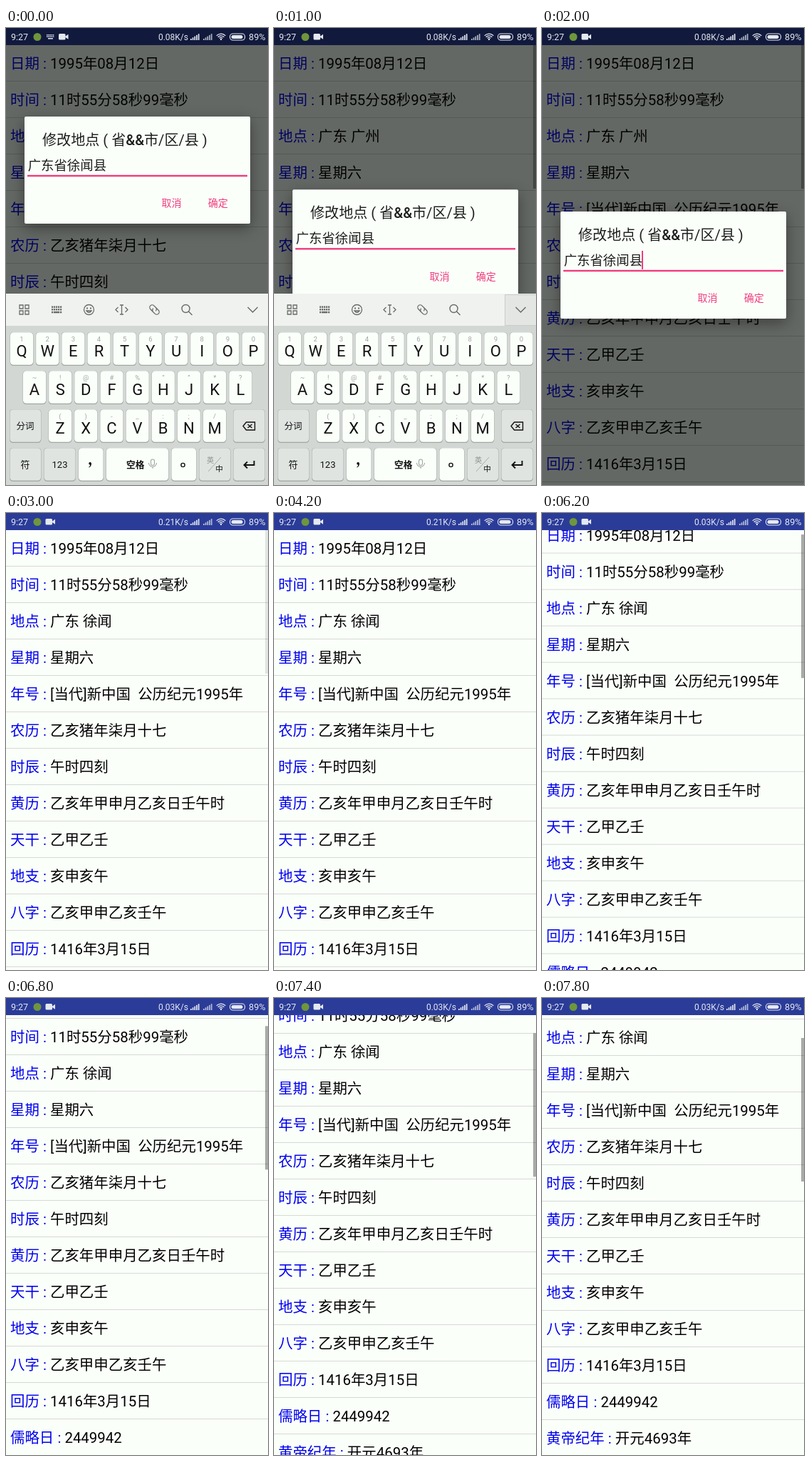
Write an HTML page with a canvas that moves like this. It is 368x640 px and loops after 8 s.

```html
<!DOCTYPE html>
<html lang="zh-CN">
<head>
<meta charset="utf-8">
<title>万年历</title>
<style>
html, body { margin: 0; width: 100%; height: 100%; overflow: hidden; background: #fbfffa; }
canvas { display: block; width: 368px; height: 640px; }
</style>
</head>
<body>
<canvas id="stage"></canvas>
<script>
const W = 368, H = 640, LOOP = 8000, STEP = 200;
const BAR = 24, PITCH = 51;
const FONT = 'Roboto, "Noto Sans CJK SC", "Noto Sans CJK", sans-serif';
const PAPER = '#fbfffa', PINK = '#f03c7e', ICON = '#686c69';

const canvas = document.getElementById('stage');
const dpr = window.devicePixelRatio || 1;
canvas.width = W * dpr;
canvas.height = H * dpr;
const c = canvas.getContext('2d');

const rows = [
  ['日期', '1995年08月12日'],
  ['时间', '11时55分58秒99毫秒'],
  ['地点', ''],
  ['星期', '星期六'],
  ['年号', '[当代]新中国  公历纪元1995年'],
  ['农历', '乙亥猪年柒月十七'],
  ['时辰', '午时四刻'],
  ['黄历', '乙亥年甲申月乙亥日壬午时'],
  ['天干', '乙甲乙壬'],
  ['地支', '亥申亥午'],
  ['八字', '乙亥甲申乙亥壬午'],
  ['回历', '1416年3月15日'],
  ['儒略日', '2449942'],
  ['黄帝纪年', '开元4693年']
];

const clamp = v => Math.max(0, Math.min(1, v));
const ramp = (t, a, b) => clamp((t - a) / (b - a));
const easeOut = p => 1 - (1 - p) ** 3;

function rect(x, y, w, h, fill) {
  c.fillStyle = fill;
  c.fillRect(x, y, w, h);
}

function round(x, y, w, h, r, fill) {
  c.beginPath();
  c.roundRect(x, y, w, h, r);
  c.fillStyle = fill;
  c.fill();
}

function text(str, x, y, size, fill, weight = 400, align = 'left') {
  c.font = `${weight} ${size}px ${FONT}`;
  c.textAlign = align;
  c.fillStyle = fill;
  c.fillText(str, x, y);
  return c.measureText(str).width;
}

function stroke(path, color, width = 1.3) {
  c.strokeStyle = color;
  c.lineWidth = width;
  c.stroke(new Path2D(path));
}

function at(x, y, draw) {
  c.save();
  c.translate(x, y);
  draw();
  c.restore();
}

function list(place, scroll, barAlpha) {
  rect(0, 0, W, H, PAPER);
  rows.forEach(([label, value], i) => {
    const y = BAR + i * PITCH - scroll;
    const w = text(label + ' : ', 6, y + 33, 20.44, '#0000f0');
    text(value || place, 6 + w, y + 33, 20.44, '#000');
    rect(0, y + 50, W, 1, '#d6dad6');
  });
  if (barAlpha > 0) rect(364, BAR + scroll / 3, 4, 201, `rgba(0,0,0,${0.33 * barAlpha})`);
  rect(0, 0, W, BAR, '#2b3c98');
}

function signal(x, fill) {
  for (let i = 0; i < 5; i++) rect(x + i * 2.7, 15 - i * 1.7, 1.7, 2 + i * 1.7, fill);
}

function statusBar(speed, typing) {
  const ink = '#e4e8f0';
  text('9:27', 7, 17, 12.5, ink);
  c.beginPath();
  c.arc(44, 12.5, 5.5, 0, 7);
  c.fillStyle = '#6f963c';
  c.fill();
  if (typing) {
    for (let r = 0; r < 2; r++)
      for (let i = 0; i < 5; i++) rect(57 + i * 2.2, 9 + r * 2.4, 1.5, 1.5, ink);
    rect(59, 14, 7, 1.5, ink);
  }
  at(typing ? 74 : 55.5, 8, () => {
    round(0, 0, 9.5, 8.5, 1.5, ink);
    c.fill(new Path2D('M9 4 L13.5 .8 V7.7 L9 4.8 Z'));
  });
  text(speed, 256, 17, 12, ink, 400, 'right');
  signal(259, ink);
  signal(277, 'rgba(228,232,240,.75)');
  at(302, 16.5, () => {
    for (const r of [3, 5.7, 8.4]) {
      c.beginPath();
      c.arc(0, 0, r, -Math.PI * 0.77, -Math.PI * 0.23);
      c.strokeStyle = ink;
      c.lineWidth = 1.3;
      c.stroke();
    }
    rect(-1, -1.5, 2, 2, ink);
  });
  c.beginPath();
  c.roundRect(314.5, 8, 21, 9, 4);
  c.strokeStyle = ink;
  c.lineWidth = 1.1;
  c.stroke();
  round(316.5, 10, 16, 5, 2.5, ink);
  text('89%', 341, 17, 12.7, ink);
}

function title(x, y) {
  const ink = '#1c1e1c';
  for (const [part, weight] of [['修改地点 ( 省', 400], ['&&', 500], ['市/区/县 )', 400]])
    x += text(part, x, y, 20.1, ink, weight);
}

function dialog(top, cursor) {
  at(26, top, () => {
    c.save();
    c.shadowColor = 'rgba(0,0,0,.4)';
    c.shadowBlur = 20 * dpr;
    c.shadowOffsetY = 6 * dpr;
    round(0, 0, 317, 150, 2, PAPER);
    c.restore();
    title(25, 39.7);
    text('广东省徐闻县', 4.7, 74.8, 18.4, '#1c1e1c');
    rect(4, 81.8, 309, 2.4, PINK);
    if (cursor) rect(114, 55, 2, 26, PINK);
    text('取消', 192.5, 126.4, 14, PINK);
    text('确定', 257.8, 126.4, 14, PINK);
  });
}

function key(x, y, w, special) {
  round(x - 0.4, y, w + 0.8, 47, 4.5, '#a2a6a3');
  round(x, y + 0.2, w, 45.5, 4.5, special ? '#e0e4e1' : PAPER);
}

function letters(x, y, caps, hints) {
  [...caps].forEach((ch, i) => {
    const kx = x + i * 36.17, mid = kx + 16;
    key(kx, y, 32, false);
    text(hints[i], mid, y + 13, 9.5, '#a3a6a4', 400, 'center');
    text(ch, mid, y + 34, 22, '#111', 400, 'center');
  });
}

function toolbar(pressed) {
  rect(0, 372, W, 45, '#eff2ee');
  if (pressed) {
    rect(324, 373, 44, 44, '#c9cdca');
    rect(325, 374, 43, 42, '#e3e6e3');
  }
  at(25.5, 394.5, () => {
    stroke('M-6.5 -6.5 h5 v5 h-5 Z M1.5 -6.5 h5 v5 h-5 Z M-6.5 1.5 h5 v5 h-5 Z M1.5 1.5 h5 v5 h-5 Z', ICON);
  });
  at(71, 394.5, () => {
    for (let r = 0; r < 2; r++)
      for (let i = 0; i < 5; i++) rect(-7 + i * 3, -5 + r * 3.6, 2.2, 2.4, ICON);
    rect(-7, 2.4, 2.2, 2.4, ICON);
    rect(-4, 2.4, 8.2, 2.4, ICON);
    rect(5, 2.4, 2.2, 2.4, ICON);
  });
  at(116.5, 394.5, () => {
    stroke('M-7 0 a7 7 0 1 0 14 0 a7 7 0 1 0 -14 0 M-3.5 1.5 Q0 6 3.5 1.5 Z', ICON);
    rect(-3.5, -3, 2, 2, ICON);
    rect(1.5, -3, 2, 2, ICON);
  });
  at(162.5, 394.5, () => {
    stroke('M-5 -3.5 L-8.5 0 L-5 3.5 M5 -3.5 L8.5 0 L5 3.5 M0 -6.5 V6.5 M-2.5 -6.5 H2.5 M-2.5 6.5 H2.5', ICON);
  });
  at(208.5, 394.5, () => {
    c.rotate(Math.PI / 4);
    stroke('M1 3.5 H-4.5 a3.5 3.5 0 0 1 0 -7 H-1 a3.5 3.5 0 0 1 3.5 3.5 M-1 -3.5 H4.5 a3.5 3.5 0 0 1 0 7 H1 a3.5 3.5 0 0 1 -3.5 -3.5', ICON);
  });
  at(254, 394.5, () => {
    stroke('M-7 -1.5 a5.5 5.5 0 1 0 11 0 a5.5 5.5 0 1 0 -11 0 M2.5 2.5 L7.5 7.5', ICON, 1.4);
  });
  at(346.5, 394.5, () => stroke('M-7 -3.5 L0 3.5 L7 -3.5', ICON, 1.5));
}

function keyboard(pressed) {
  rect(0, 372, W, 268, '#d3d7d4');
  toolbar(pressed);
  letters(6, 426, 'QWERTYUIOP', '1234567890');
  letters(24, 480, 'ASDFGHJKL', '~!@#%“”*?');
  letters(60, 534, 'ZXCVBNM', '()-_:;/');

  key(5.5, 534, 43.5, true);
  text('分词', 27, 562, 12.5, '#111', 500, 'center');
  key(319.5, 534, 44, true);
  at(341.5, 557.5, () => {
    stroke('M-8.5 0 L-4 -5.5 H8 V5.5 H-4 Z M-2 -2.5 L4 2.5 M4 -2.5 L-2 2.5', '#111', 1.4);
  });

  key(5.5, 588, 43.5, true);
  text('符', 27, 616, 13, '#111', 400, 'center');
  key(53.5, 588, 44, true);
  text('123', 75.5, 616, 13, '#111', 400, 'center');
  key(102, 588, 34.5, false);
  at(118, 610, () => {
    c.fillStyle = '#111';
    c.fill(new Path2D('M-1.8 0 a1.9 1.9 0 0 1 3.8 0 Q2 4 -1.6 5.6 L-1.9 4.9 Q0 4 .2 1.8 Q-1.8 1.8 -1.8 0 Z'));
  });
  key(141, 588, 87, false);
  text('空格', 169, 615.5, 12.7, '#111', 700);
  at(206, 610, () => {
    stroke('M-2.5 -3.5 a2.5 2.5 0 0 1 5 0 V0 a2.5 2.5 0 0 1 -5 0 Z M-5.5 -1 a5.5 5.5 0 0 0 11 0 M0 4.5 V7', '#a3a6a4', 1.1);
  });
  key(232.5, 588, 34.5, false);
  at(248.5, 612, () => stroke('M-2.6 0 a2.6 2.6 0 1 0 5.2 0 a2.6 2.6 0 1 0 -5.2 0', '#111', 1.4));
  key(271.5, 588, 43.5, true);
  text('英', 287, 609, 10, '#8d908e', 400, 'center');
  stroke('M284 621 L302 601', '#a3a6a4', 0.9);
  text('中', 299.5, 621, 10.5, '#111', 500, 'center');
  key(319.5, 588, 44, true);
  at(341.5, 611, () => stroke('M7 -5 V1 H-6.5 M-2.5 -3.5 L-7 1 L-2.5 5.5', '#111', 1.9));
}

function draw(t) {
  c.setTransform(dpr, 0, 0, dpr, 0, 0);
  const saved = t >= 2600;
  const scroll = t < 6800 ? 46 * ramp(t, 5800, 6800) : 46 + 50 * ramp(t, 6800, 7800);
  let barAlpha = t >= 1000 ? 1 - ramp(t, 2720, 3120) : 0;
  if (scroll > 0) barAlpha = 1;
  list(saved ? '广东 徐闻' : '广东 广州', scroll, barAlpha);

  const shown = 1 - ramp(t, 2500, 2800);
  if (shown > 0) {
    rect(0, 0, W, H, `rgba(0,4,0,${0.6 * shown})`);
    c.globalAlpha = shown;
    dialog(124 + 133 * easeOut(ramp(t, 874, 1200)), (t + 600) % 1100 < 500);
    c.globalAlpha = 1;
  }
  const speed = t < 2800 ? '0.08K/s' : t < 6000 ? '0.21K/s' : '0.03K/s';
  statusBar(speed, t < 1000);
  if (t < 1200) keyboard(t >= 800);
}

const start = performance.now();
function tick() {
  const t = (performance.now() - start) % LOOP;
  draw(Math.floor(t / STEP) * STEP);
  requestAnimationFrame(tick);
}
tick();
</script>
</body>
</html>
```
